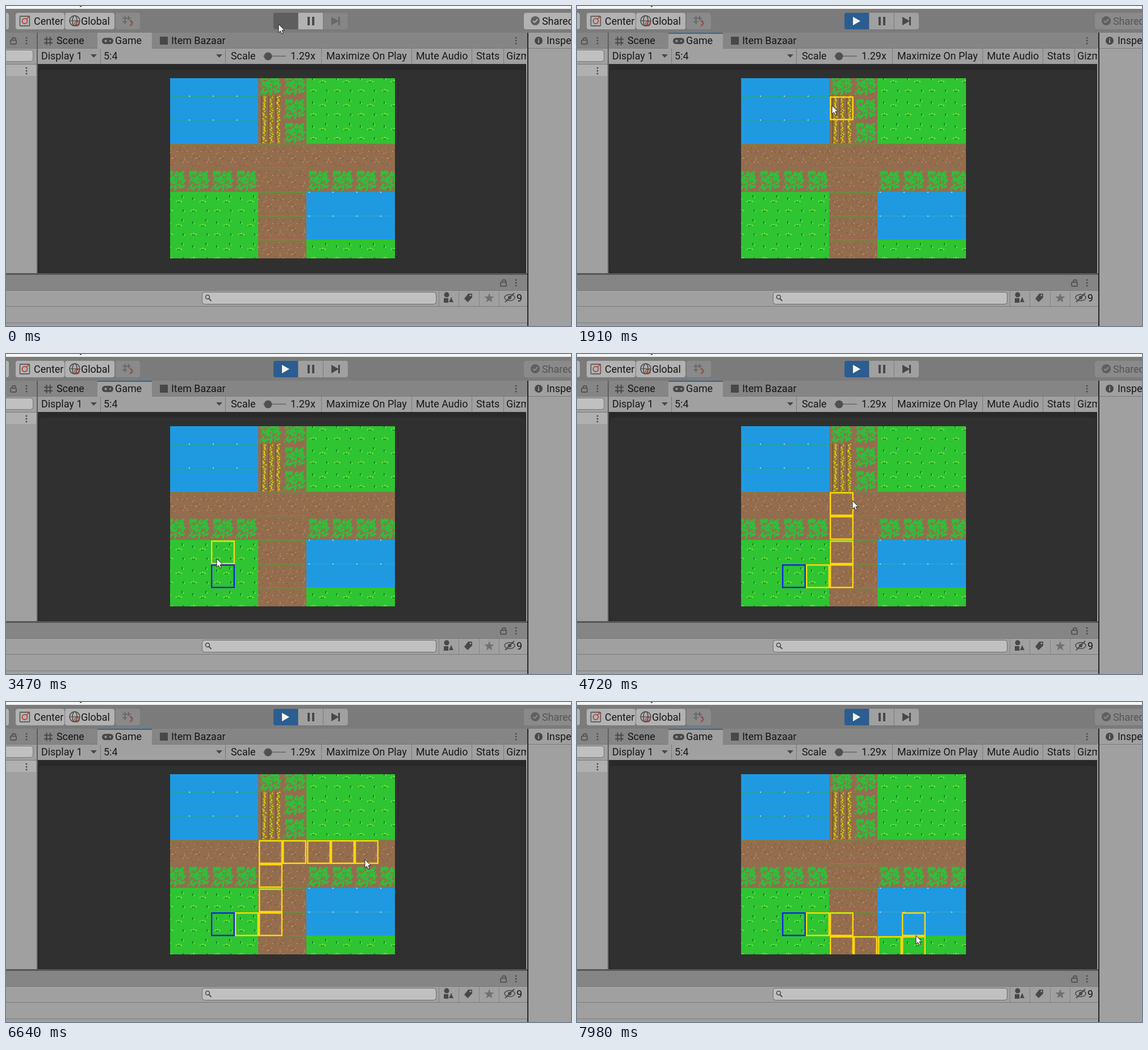
These frames come from a looping animation (995x563 px, 8 s). An HTML page with a canvas:

```html
<!DOCTYPE html>
<html lang="en">
<head>
<meta charset="utf-8">
<title>Tile path preview</title>
<style>
html, body { margin: 0; width: 100%; height: 100%; overflow: hidden; background: #a0a0a0; }
canvas { display: block; }
</style>
</head>
<body>
<canvas id="stage" width="995" height="563"></canvas>
<script>
const LOOP = 8000;
const TILE = 42.2, LEFT = 276, TOP = 116.1;
const VIEW = [289, 127, 396, 317];
const START = [2, 6];
const PLAY_AT = 500, SELECT_AT = 2890;
const POINTER_TICK = 143;
const INK = '#161616', ICON = '#484848', PANEL = '#a0a0a0', STRIP = '#858585';
const BUTTON = '#b2b2b2', EDGE = '#7a7a7a', RED = '#b8322b';
const GRASS = '#2fc432', DIRT = '#946d4e', WATER = '#1f9ae1';

// Turning points of the pointer: time, x, y.
const WAYPOINTS = [
  [1220, 480, 32], [1910, 449, 175], [2480, 371, 374], [3030, 371, 374],
  [3470, 371, 360], [4170, 481, 274], [4720, 485, 258], [4990, 484, 239],
  [5590, 568, 219], [6330, 629, 236], [6640, 632, 277], [6790, 632, 315],
  [7980, 597, 411]
];

const canvas = document.getElementById('stage');
const backdrop = document.createElement('canvas');
backdrop.width = canvas.width;
backdrop.height = canvas.height;
let g = backdrop.getContext('2d');

function rect(color, x, y, w, h, radius = 0) {
  g.fillStyle = color;
  g.beginPath();
  g.roundRect(x, y, w, h, radius);
  g.fill();
}

function frame(color, x, y, w, h, radius = 0, width = 1) {
  g.strokeStyle = color;
  g.lineWidth = width;
  g.beginPath();
  g.roundRect(x, y, w, h, radius);
  g.stroke();
}

function dot(color, x, y, r) {
  g.fillStyle = color;
  g.beginPath();
  g.arc(x, y, r, 0, 7);
  g.fill();
}

function ring(color, x, y, rx, ry = rx, width = 1.5) {
  g.strokeStyle = color;
  g.lineWidth = width;
  g.beginPath();
  g.ellipse(x, y, rx, ry, 0, 0, 7);
  g.stroke();
}

function arc(color, width, x, y, r, from, to) {
  g.strokeStyle = color;
  g.lineWidth = width;
  g.beginPath();
  g.arc(x, y, r, from, to);
  g.stroke();
}

function shape(color, x, y, points) {
  g.fillStyle = color;
  g.beginPath();
  for (let i = 0; i < points.length; i += 2) g.lineTo(x + points[i], y + points[i + 1]);
  g.closePath();
  g.fill();
}

function line(color, width, x1, y1, x2, y2) {
  g.strokeStyle = color;
  g.lineWidth = width;
  g.beginPath();
  g.moveTo(x1, y1);
  g.lineTo(x2, y2);
  g.stroke();
}

function text(label, x, y, color = INK) {
  g.fillStyle = color;
  g.font = '17.9px Roboto, sans-serif';
  g.fillText(label, x, y);
}

function clipped(box, draw) {
  g.save();
  g.beginPath();
  g.rect(...box);
  g.clip();
  draw();
  g.restore();
}

function seeded(seed) {
  return () => {
    seed = (seed * 1664525 + 1013904223) % 4294967296;
    return seed / 4294967296;
  };
}

// ---- Map tiles, drawn in a 42 px cell ----

function tuft(x, y) {
  for (let i = 0; i < 3; i++) shape('#6fe53c', x + i * 4, y, [0, 5, 2.5, i % 2 ? 0 : 2, 5, 5]);
  rect('#148529', x + 3, y + 4, 6, 1.4);
}

function blade(x, y) {
  rect('#148529', x, y, 2, 4);
  rect('#5be03a', x + 2, y + 2, 2.4, 2.6);
}

const TILES = {
  grass() {
    for (const side of [0, 1]) {
      tuft(6 + side * 16, 29 - side * 16);
      blade(10 + side * 23, 10 - side * 4);
    }
    blade(35, 31);
  },
  dirt() {
    const random = seeded(12);
    const colors = ['#e2b48a', '#6b4a2f', '#cfa447', '#7a573c'];
    for (let i = 0; i < 32; i++) rect(colors[i % 4], random() * 41, 3 + random() * 38, 1.3, 1.3);
    rect('#3aae2e', 0, 0, 43, 1);
  },
  bush() {
    const random = seeded(7);
    for (let i = 0; i < 100; i++) {
      const lean = random() < .7 ? 3 : -2;
      shape('#2fc03c', 3 + random() * 33, 5 + random() * 32, [lean, 0, lean + 2.4, 1, 2.4, 5, 0, 4]);
    }
  },
  wheat() {
    const random = seeded(5);
    for (let x = 7; x < 42; x += 12.6) {
      rect('#7c5b35', x - 2, 0, 2, 43);
      for (let i = 0; i < 26; i++) {
        const y = i * 1.65;
        rect('#dfe006', x + random() * 5, y, 1.4 + random() * 2.4, 1.7);
        rect('#82741c', x + random() * 6, y, 1.4, 1.4);
      }
    }
  },
  water(row) {
    if (row === 0) return;
    if (row < 3) rect('#2bab55', 0, 0, 43, 1);
    if (row === 6) rect('#37a6cd', 0, 0, 43, 1);
    rect('#f4fbff', 4, 0, 2, 1.2);
  }
};

function tileAt(col, row) {
  const middle = col === 4 || col === 5;
  if (row === 3) return 'dirt';
  if (row < 3) return col < 4 ? 'water' : col > 5 ? 'grass' : col === 4 && row ? 'wheat' : 'bush';
  if (middle) return 'dirt';
  if (row === 4) return 'bush';
  return col > 5 && row < 7 ? 'water' : 'grass';
}

function drawMap() {
  for (let row = 0; row < 8; row++) {
    for (let col = 0; col < 10; col++) {
      const kind = tileAt(col, row);
      const base = kind === 'water' ? WATER : kind === 'grass' ? GRASS : DIRT;
      g.save();
      g.translate(Math.floor(LEFT + col * TILE), Math.floor(TOP + row * TILE));
      rect(base, 0, 0, 43, 43);
      TILES[kind](row);
      g.restore();
    }
  }
}

// ---- Editor window ----

function menuDots(x, y) {
  for (const dy of [-5, 0, 5]) rect(ICON, x - 1.2, y + dy - 1.2, 2.5, 2.5);
}

function lock(x, y) {
  frame(ICON, x - 5, y - 1, 10, 7, 1, 1.5);
  arc(ICON, 1.5, x + 1, y - 2, 3.3, Math.PI, 0);
}

function dropArrow(x) {
  shape(ICON, x, 85, [0, 0, 11, 0, 5.5, 6]);
}

function grid(color, x, y, size) {
  for (const f of [.3, .72]) {
    line(color, 2, x + size * f, y, x + size * f, y + size);
    line(color, 2, x, y + size * f, x + size, y + size * f);
  }
}

function drawToolbar() {
  rect('#7b7b7b', 0, 0, 995, 47);
  rect('#f6f6f6', 0, 0, 995, 5);
  rect('#333', 130, 0, 3, 1.5);
  rect(BUTTON, -5, 12, 10, 29, 4);
  rect(BUTTON, 17, 12, 86, 29, 4);
  rect(BUTTON, 104, 12, 87, 29, 4);
  rect('#8a8a8a', 193, 12, 43, 29, 4);

  frame(ICON, 24.5, 18, 17, 17, 1, 1.3);
  ring(RED, 33, 26.5, 4.5);
  line(RED, 1.5, 36, 23, 41, 18);
  text('Center', 49, 33);

  ring(ICON, 121, 26, 9);
  ring(ICON, 121, 26, 4, 9);
  line(ICON, 1.2, 112, 26, 130, 26);
  ring(RED, 125, 31, 4);
  text('Global', 132, 33);

  grid('#686868', 205, 17, 15);
  rect('#8a8a8a', 213, 25, 12, 11);
  arc('#8c5652', 3, 218, 30, 4, -1.6, 1.6);
}

function drawLeftPanel() {
  rect(PANEL, 0, 47, 54, 423);
  rect(STRIP, 0, 47, 54, 27);
  lock(13, 61);
  menuDots(36, 61);
  rect(EDGE, 0, 74, 54, 1);
  rect('#c0c0c0', -10, 78, 57, 19, 4);
  frame(EDGE, -10, 77.5, 57.5, 20, 4);
  rect(EDGE, 0, 102, 54, 1);
  rect('#b0b0b0', 0, 103, 53, 20);
  menuDots(36, 114);
  rect('#5e5e5e', 54, 47, 2, 426);
}

function drawGamePanel() {
  rect(STRIP, 56, 47, 862, 27);
  rect(PANEL, 56, 74, 860, 28);
  rect(EDGE, 56, 74, 860, 1);
  rect(PANEL, 161, 47, 96, 28);

  grid(ICON, 67, 54, 15);
  text('Scene', 89, 67);
  rect(ICON, 169, 56, 20, 11, 5.5);
  line(PANEL, 1.5, 173, 61.5, 178, 61.5);
  line(PANEL, 1.5, 175.5, 59, 175.5, 64);
  dot(PANEL, 183.5, 61.5, 1.6);
  text('Game', 192, 67);
  rect(ICON, 271, 54, 14, 14);
  text('Item Bazaar', 291, 67);
  menuDots(898, 61);

  for (const x of [166, 386, 555, 714, 820, 876]) rect(EDGE, x, 75, 1, 27);
  text('Display 1', 62, 94);
  dropArrow(149);
  text('5:4', 172, 94);
  dropArrow(370);
  text('Scale', 396, 94);
  rect('#666', 453, 87.5, 40, 1.5);
  dot('#505050', 461.5, 88.5, 7);
  text('1.29x', 501, 94);
  text('Maximize On Play', 564, 94);
  text('Mute Audio', 722, 94);
  text('Stats', 828, 94);
  clipped([877, 75, 39, 27], () => text('Gizmos', 881, 94));

  rect('#292929', 56, 102, 860, 368);
  rect('#303030', 58, 112, 856, 357, 6);
  clipped(VIEW, drawMap);
}

function drawBottomPanel() {
  rect('#575757', 0, 470, 918, 3);
  rect(STRIP, 0, 473, 918, 27);
  rect(PANEL, 0, 500, 918, 63);
  for (const y of [500, 528, 557]) rect(EDGE, 0, y, 918, 1);
  for (const x of [762, 797, 833, 868]) rect(STRIP, x, 501, 1, 27);
  lock(876, 487);
  menuDots(898, 487);

  rect('#c0c0c0', 346, 504, 411, 20, 4);
  frame('#6e6e6e', 345.5, 503.5, 412, 21, 4);
  ring(ICON, 355, 512, 3.5);
  line(ICON, 1.8, 357.5, 515, 361.5, 519);

  dot(ICON, 776, 508, 4.5);
  rect(ICON, 771, 514, 8, 8);
  shape(ICON, 780, 512, [4, 0, 8, 9, 0, 9]);

  shape(ICON, 807, 506, [7, 0, 14, 0, 14, 7, 6, 15, 0, 9]);
  dot(PANEL, 818, 509, 1.5);

  const star = [];
  for (let i = 0; i < 10; i++) {
    const angle = i * Math.PI / 5, r = i % 2 ? 3.8 : 9;
    star.push(r * Math.sin(angle), -r * Math.cos(angle));
  }
  shape('#717171', 851, 514, star);

  ring(ICON, 887, 513, 9, 5.5);
  dot(ICON, 887, 513, 3);
  line(ICON, 1.8, 879, 521, 895, 505);
  text('9', 899, 520);
}

function drawInspector() {
  rect(PANEL, 920, 47, 75, 516);
  rect('#272727', 918, 47, 2, 516);
  rect(EDGE, 920, 74, 75, 1);
  dot(ICON, 938, 61, 7);
  rect(PANEL, 937, 57, 2, 2);
  rect(PANEL, 937, 60, 2, 5);
  text('Inspector', 952, 67);
}

function drawPlayControls(playing) {
  const step = playing ? ICON : '#686868';
  const share = playing ? '#8a8a8a' : BUTTON;
  const triangle = [0, 0, 13, 7.5, 0, 15];

  rect(playing ? '#2c5d90' : '#5e5e5e', 471, 12, 43, 29, [4, 0, 0, 4]);
  if (playing) shape('#f4f4f4', 486, 19, triangle);
  rect(playing ? '#a0a0a0' : BUTTON, 515, 12, 43, 29);
  for (const x of [531, 539]) rect(ICON, x, 19, 4, 15);
  rect(playing ? '#a0a0a0' : '#868686', 559, 12, 43, 29, [0, 4, 4, 0]);
  shape(step, 573, 19, triangle);
  rect(step, 585, 19, 3, 15);

  rect(share, 912, 12, 90, 29, 4);
  dot('#606060', 932, 26, 8);
  line(share, 2, 928, 26, 931, 29);
  line(share, 2, 931, 29, 936, 23);
  text('Shared', 944, 33, playing ? '#555' : INK);
  if (playing) rect('#3467a3', 161, 47, 96, 2);
}

// ---- Animated overlay ----

// The pointer hops between waypoints in equal steps of about one tick.
function pointerAt(time) {
  const next = WAYPOINTS.findIndex(point => point[0] > time);
  if (next < 1) return WAYPOINTS.at(next).slice(1);
  const [t0, x0, y0] = WAYPOINTS[next - 1];
  const [t1, x1, y1] = WAYPOINTS[next];
  const steps = Math.max(1, Math.round((t1 - t0) / POINTER_TICK));
  const part = Math.floor((time - t0) / (t1 - t0) * steps) / steps;
  return [x0 + (x1 - x0) * part, y0 + (y1 - y0) * part];
}

function outline(color, [col, row]) {
  const x = Math.ceil(LEFT + col * TILE), y = Math.ceil(TOP + row * TILE);
  frame(color, x + 1.2, y + 1.2, TILE - 2.6, TILE - 2.6, 0, 2.4);
}

// Corner tiles of the walk from START to the hovered tile.
function corners(col, row) {
  if (col > 5 && row > 4) return [[4, 6], [4, 7], [col, 7], [col, row]];
  if (col < 4) return [[col, 6], [col, row]];
  const lane = col === 5 || col === 6 ? 5 : 4;
  return [[lane, 6], [lane, 3], [col, 3], [col, row]];
}

function walk(stops) {
  const path = [];
  let [col, row] = START;
  for (const [endCol, endRow] of stops) {
    while (col !== endCol || row !== endRow) {
      col += Math.sign(endCol - col);
      row += Math.sign(endRow - row);
      path.push([col, row]);
    }
  }
  return path;
}

function drawHighlights(selected, x, y) {
  if (y < VIEW[1]) return;
  const tile = [Math.floor((x - LEFT) / TILE), Math.floor((y - TOP) / TILE)];
  for (const step of selected ? walk(corners(...tile)) : [tile]) outline('#ffd60a', step);
  if (selected) outline('#0d2bdc', START);
}

function drawPointer(x, y) {
  shape('#fff', x, y, [0, 0, 0, 15, 3.4, 11.8, 5.8, 17, 8.2, 16, 6, 10.8, 10.6, 10.8]);
  g.strokeStyle = '#222';
  g.lineWidth = 1;
  g.stroke();
}

function render(now) {
  const time = now % LOOP;
  const [x, y] = pointerAt(time);
  g.drawImage(backdrop, 0, 0);
  drawPlayControls(time >= PLAY_AT);
  clipped(VIEW, () => drawHighlights(time >= SELECT_AT, x, y));
  drawPointer(x, y);
  requestAnimationFrame(render);
}

drawToolbar();
drawLeftPanel();
drawGamePanel();
drawBottomPanel();
drawInspector();
g = canvas.getContext('2d');
requestAnimationFrame(render);
</script>
</body>
</html>
```
